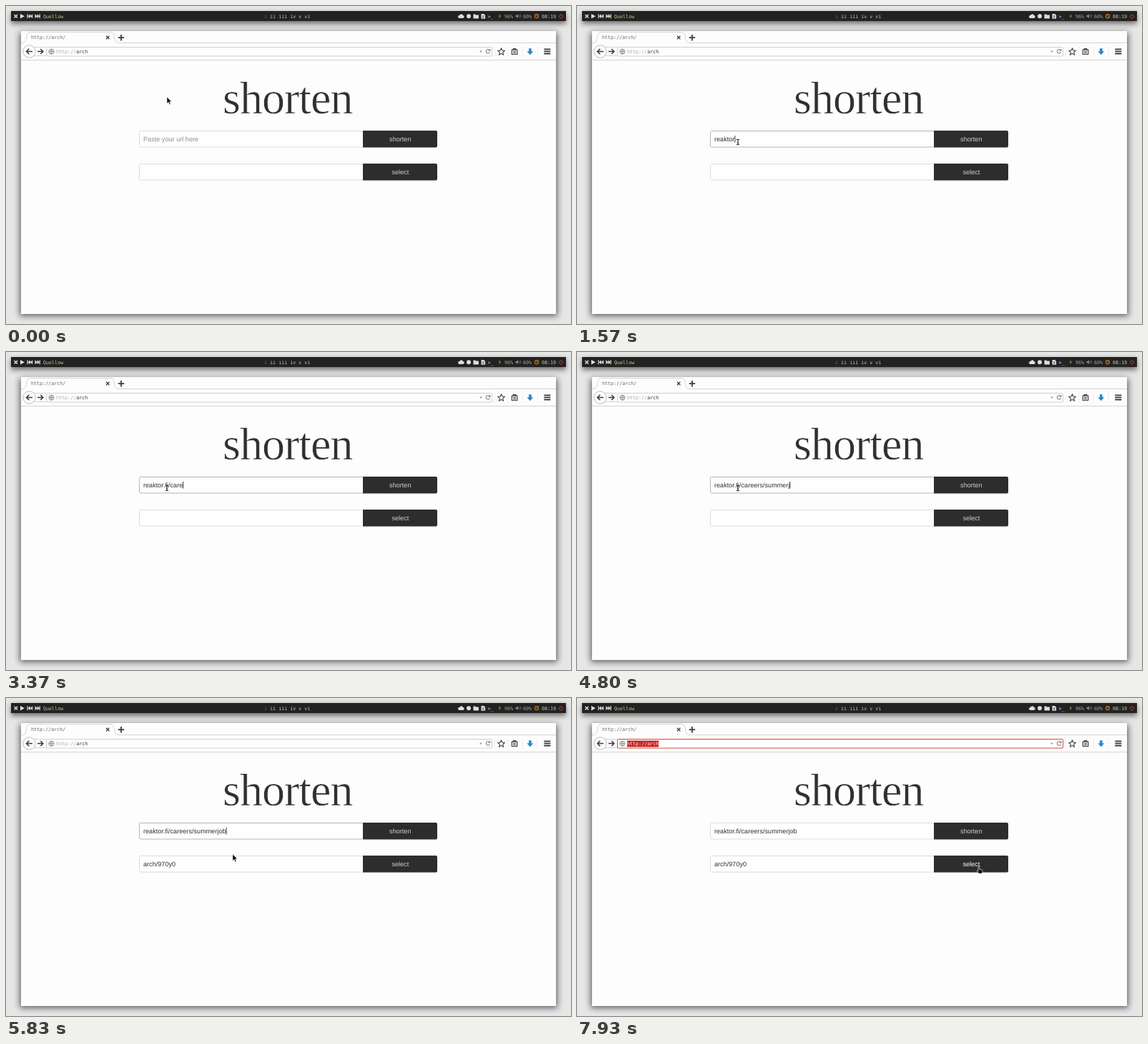
An HTML page for the animation above (8 s loop, 790 px wide and 444 px high).

```html
<!DOCTYPE html>
<html lang="en">
<head>
<meta charset="utf-8">
<title>shorten</title>
<style>
  html, body { margin: 0; width: 100%; height: 100%; overflow: hidden; background: #e6e6e6; }
  svg { display: block; width: 100%; height: 100%; }
  text { text-rendering: geometricPrecision; white-space: pre; }
  .mono { font: 6.7px "DejaVu Sans Mono", monospace; }
  .sans { font: 9.15px "Liberation Sans", Arial, sans-serif; }
  .title { font: 64px "Liberation Serif", serif; letter-spacing: -1px; fill: #303030; stroke: #fdfdfd; stroke-width: .7; }
  .line { fill: none; stroke: #d2d2de; }
  .ink { fill: none; stroke: #3c3c3c; stroke-width: 1.6; }
  .field { fill: #fefefe; stroke: #dcdce6; }
  .field.focus { stroke: #b4b4bc; }
  .button { fill: #2d2d2d; }
  .label { fill: #cfcfcf; text-anchor: middle; }
  .label.hover { fill: #fff; }
</style>
</head>
<body>
<svg viewBox="0 0 790 444">
  <defs>
    <filter id="blur" x="-10%" y="-10%" width="120%" height="120%"><feGaussianBlur stdDeviation="4.5"/></filter>
    <filter id="barBlur" x="-2%" y="-150%" width="104%" height="400%"><feGaussianBlur stdDeviation="3.5"/></filter>
  </defs>
  <rect width="790" height="444" fill="#e6e6e6"/>

  <!-- status bar -->
  <rect x="7" y="10" width="776" height="15" fill="#222" opacity=".6" filter="url(#barBlur)"/>
  <rect x="7" y="7" width="776" height="14" fill="#222"/>
  <g fill="#dedede">
    <path d="M11.5 12l4.5 4.5M16 12l-4.5 4.5" stroke="#dedede" stroke-width="1.5"/>
    <path d="M20 11l6 3.2-6 3.2z"/>
    <path d="M29.5 11.2h1.2v6h-1.2zM34 11.2v6l-3.3-3zM37.2 11.2v6l-3.3-3z"/>
    <path d="M40.5 11.2l3.3 3-3.3 3zM43.6 11.2l3.3 3-3.3 3zM46.6 11.2h1.2v6h-1.2z"/>
    <path d="M634 17a2 2 0 0 1 0-4a2.7 2.7 0 0 1 4.8-.3a2.2 2.2 0 0 1 .2 4.3z"/>
    <circle cx="647" cy="14.2" r="3"/>
    <path d="M653.5 11.5h2.6l.8 1h4v5h-7.4z"/>
    <path d="M664.5 11h3.6l2 2v4.8h-5.6z"/>
    <path d="M666 14h2.6M666 16h2.6" stroke="#222" stroke-width=".8"/>
  </g>
  <g class="mono" fill="#c8c8b4">
    <text x="52" y="16.5" fill="#c8c88c">Quellow</text>
    <text x="361" y="16.5"><tspan fill="#666">i</tspan> ii iii iv v vi</text>
    <text x="673.5" y="16.5" fill="#dedede">&gt;_</text>
    <text x="697" y="16.5" fill="#a5a58c">96%</text>
    <text x="723" y="16.5" fill="#a5a5a0">60%</text>
    <text x="749" y="16.5">08:19</text>
  </g>
  <path d="M690.8 10.8l-2.3 4h1.7l-.7 3 2.6-4.2h-1.7z" fill="#6c9a3c"/>
  <path d="M712.5 13h1.5l2-1.7v5.6l-2-1.7h-1.5z" fill="#888"/>
  <path d="M717.3 12.6q1.2 1.5 0 3M718.8 11.6q2 2.5 0 5" fill="none" stroke="#888" stroke-width=".7"/>
  <circle cx="742" cy="14.2" r="2.6" fill="none" stroke="#c77a20" stroke-width="1.1"/>
  <path d="M742 12.6v1.8h1.2" fill="none" stroke="#c77a20" stroke-width=".8"/>
  <path d="M774.5 12.3a2.6 2.6 0 1 0 3 0M776 11v3" fill="none" stroke="#c53a22"/>

  <!-- browser window -->
  <rect x="19" y="37" width="752" height="396" fill="#1c1c22" opacity=".64" filter="url(#blur)"/>
  <rect x="21" y="35" width="748" height="395" fill="#fdfdfd"/>
  <path class="line" d="M21 51.5h2q4 0 5-5l1-5q1-5 5-5h112q4 0 5 5l1 5q1 5 5 5h612M21 75.5h748"/>
  <text class="mono" x="35" y="46.3" fill="#666">http://arch/</text>
  <path class="ink" d="M140 41.8l4.4 4.4M144.4 41.8l-4.4 4.4" style="stroke-width:1.3"/>
  <path class="ink" d="M161 40v8.4M156.8 44.2h8.4" style="stroke-width:1.8"/>

  <path class="line" d="M38 57.5h18M38 69.5h18"/>
  <circle cx="32.5" cy="63.5" r="8.7" fill="#fdfdfd" stroke="#b9b9c4"/>
  <path class="ink" d="M37 63.5h-8M32.3 59.8l-3.7 3.7 3.7 3.7M44 63.5h7.5M48.3 60l3.5 3.5-3.5 3.5"/>
  <rect id="urlBox" x="56.5" y="57.5" width="623" height="12.5" rx="1" fill="#fefefe"/>
  <g fill="none" stroke="#888" stroke-width=".9">
    <circle cx="63.5" cy="63.7" r="3.6"/>
    <path d="M60 63.7h7M63.5 60.2q-3 3.5 0 7M63.5 60.2q3 3.5 0 7"/>
    <path d="M676 61.3a2.8 2.8 0 1 0 .6 3.2M676.8 60v2.4h-2.4" stroke-width="1.1"/>
  </g>
  <rect id="urlMark" y="59.5" x="70" height="8.8" fill="#c8201c"/>
  <text id="url" class="mono" x="70" y="66.3"><tspan id="scheme">http://</tspan><tspan id="host">arch</tspan></text>
  <path d="M662 62.5h3.8l-1.9 2.8z" fill="#a0a0a0"/>
  <path class="line" d="M683.5 57v13M702 57v13M722.5 57v13M743 57v13" stroke-dasharray="1 2"/>
  <path class="ink" d="M692.5 59l1.4 3.1 3.3.3-2.5 2.3.7 3.4-2.9-1.8-2.9 1.8.7-3.4-2.5-2.3 3.3-.3z" style="stroke-width:1.1"/>
  <path class="ink" d="M707.3 61.2h7.4v6.3h-7.4zM709.3 61v-1.4h3.4V61M709 63.5h4M709 65.5h4" style="stroke-width:1.2"/>
  <path d="M731 59.2h3.6v4h2.6l-4.4 5-4.4-5h2.6z" fill="#2588cc"/>
  <path class="ink" d="M752.3 60.3h9M752.3 63.4h9M752.3 66.5h9" style="stroke-width:1.8"/>

  <!-- page -->
  <text class="title" x="303" y="150">shorten</text>
  <rect id="longBox" class="field" x="186.5" y="174.5" width="314" height="22.5" rx="2"/>
  <rect class="field" x="186.5" y="220.5" width="314" height="22.5" rx="2"/>
  <path class="button" d="M499 174h102q2 0 2 2v19.5q0 2-2 2H499zM499 220h102q2 0 2 2v19.5q0 2-2 2H499z"/>
  <g class="sans">
    <text class="label" x="551.3" y="189">shorten</text>
    <text id="select" class="label" x="551.3" y="235">select</text>
    <text id="longUrl" x="192" y="189"></text>
    <rect id="shortMark" x="192" y="226.5" height="11" fill="#2a2a2a"/>
    <text id="shortUrl" x="192" y="235"></text>
  </g>
  <rect id="caret" y="181" width=".9" height="9.6" fill="#222"/>

  <g id="pointer">
    <path id="arrow" d="M0 0v9.2l2.1-1.9 1.5 3.3 1.5-.7-1.5-3.2h2.9z" fill="#0a0a0a" stroke="#fefefe" stroke-width=".5"/>
    <path id="beam" d="M-2-3.6h1.5q.5 0 .5.6v6q0 .6-.5.6H-2M2-3.6H.5Q0-3.6 0-3M0 3q0 .6.5.6H2M-1 1h2" fill="none" stroke="#141414" stroke-width="1"/>
    <path id="hand" d="M-1-4.5q1-1 1.7 0V-1l3.6.8q1 .4.8 1.7l-.7 3.6H-.2L-2.6 1.8q-.3-1 .6-1l1 .7z" fill="#141414" stroke="#e8e8e8" stroke-width=".7"/>
  </g>
</svg>
<script>
const LOOP = 8000;
const LONG_URL = "reaktor.fi/careers/summerjob";
const SHORT_URL = "arch/970y0";
const RESULT_AT = 5250, SELECT_AT = 6500, URL_FOCUS_AT = 7700, FOCUS_AT = 800;

const smooth = p => p * p * (3 - 2 * p);
const easeIn = p => p * p;
const easeOut = p => 1 - (1 - p) ** 2;
const linear = p => p;

// Each key: [time, values, easing towards this key]
const typing = [[870, [0]], [1550, [7]], [3340, [15]], [4780, [26]], [5000, [28]]];
const moves = [
  [100, [225, 127]], [700, [225, 190], smooth], [5450, [225, 190]],
  [5830, [316, 218], easeIn], [6350, [562, 240], easeOut]
];

function track(keys, t) {
  const next = keys.findIndex(key => key[0] > t);
  if (next < 0) return keys.at(-1)[1];
  if (next === 0) return keys[0][1];
  const [t0, from] = keys[next - 1];
  const [t1, to, ease = linear] = keys[next];
  const p = ease((t - t0) / (t1 - t0));
  return from.map((v, i) => v + (to[i] - v) * p);
}

const $ = id => document.getElementById(id);
const set = (id, name, value) => $(id).setAttribute(name, value);
const show = (id, on) => set(id, "visibility", on ? "visible" : "hidden");
const textWidth = id => $(id).getComputedTextLength();

function drawFields(t) {
  const typed = LONG_URL.slice(0, Math.floor(track(typing, t)[0]));
  const focused = t >= FOCUS_AT && t < SELECT_AT;
  $("longUrl").textContent = typed || "Paste your url here";
  set("longUrl", "fill", typed ? "#333" : "#8e8e8e");
  $("longBox").classList.toggle("focus", focused);
  show("caret", focused);
  set("caret", "x", 192 + (typed ? textWidth("longUrl") : 0));

  const selected = t >= SELECT_AT && t < URL_FOCUS_AT;
  $("shortUrl").textContent = t >= RESULT_AT ? SHORT_URL : "";
  set("shortUrl", "fill", selected ? "#f4f4f4" : "#333");
  set("shortMark", "width", selected ? textWidth("shortUrl") : 0);
}

function drawAddress(t) {
  const focused = t >= URL_FOCUS_AT;
  set("urlBox", "stroke", focused ? "#cc4a40" : "#cdcdd8");
  set("urlMark", "width", focused ? textWidth("url") : 0);
  set("scheme", "fill", focused ? "#fff" : "#a8a8a8");
  set("host", "fill", focused ? "#fff" : "#333");
}

function drawPointer(t) {
  const [x, y] = track(moves, t);
  const inRow = (y > 174 && y < 197) || (y > 220 && y < 243);
  const overField = inRow && x > 186 && x < 499;
  const overButton = inRow && x >= 499 && x < 603;
  set("pointer", "transform", `translate(${x} ${y})`);
  show("beam", overField);
  show("hand", overButton);
  show("arrow", !overField && !overButton);
  $("select").classList.toggle("hover", overButton);
}

const start = performance.now();
function frame() {
  const t = (performance.now() - start) % LOOP;
  drawFields(t);
  drawAddress(t);
  drawPointer(t);
  requestAnimationFrame(frame);
}
frame();
</script>
</body>
</html>
```
